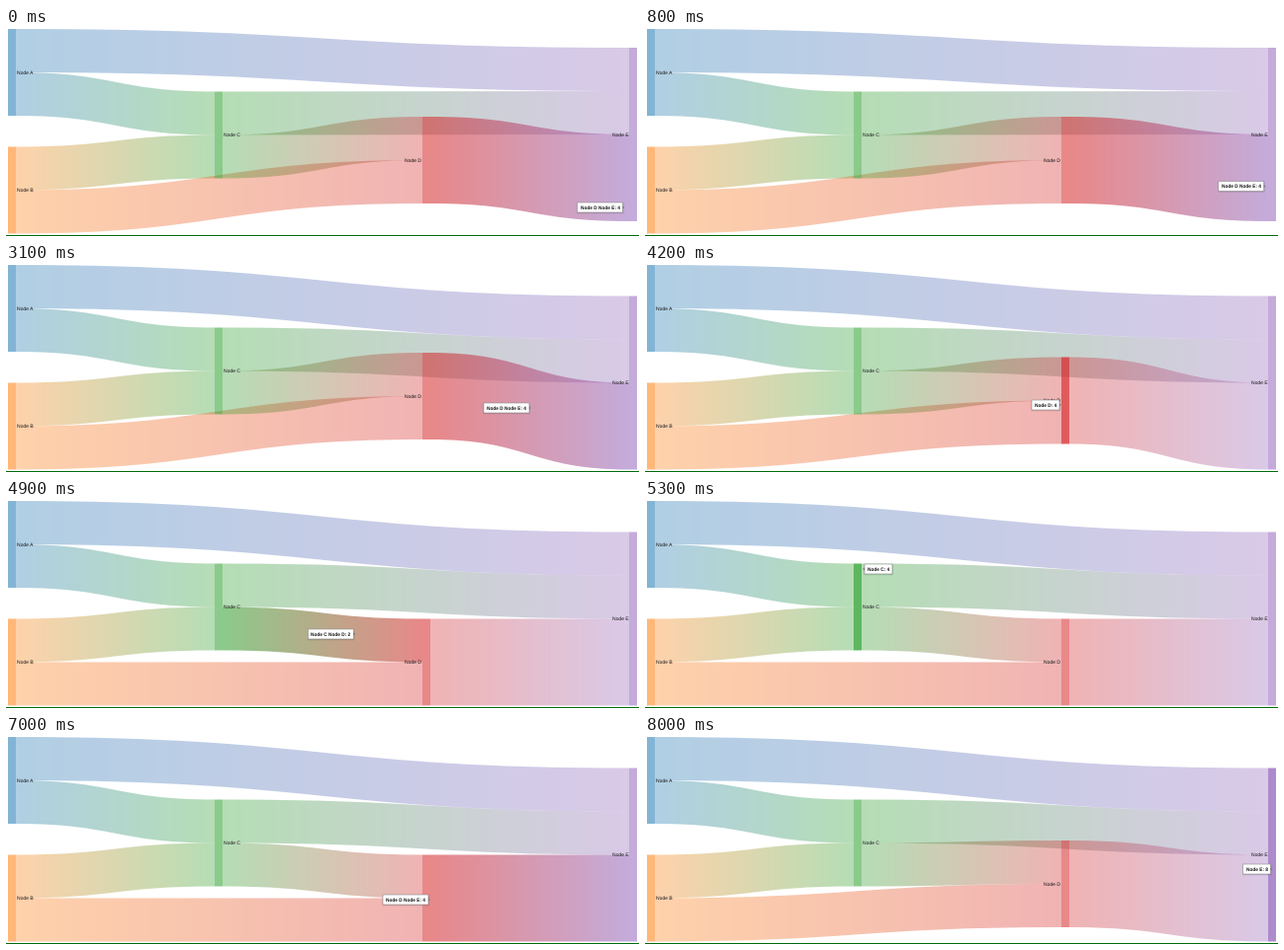
Write a matplotlib script that moves like this. It is 640 px wide and 211 px high and loops after 8100 ms.

```python
import matplotlib.pyplot as plt
import numpy as np
from matplotlib.animation import FuncAnimation
from matplotlib.colors import to_rgb
from matplotlib.patches import Polygon, Rectangle
from matplotlib.path import Path

W, H, DPI = 640, 211, 64
FRAMES, STEP = 81, 100
UNIT = 22            # pixels per unit of flow
BAR = 8              # node width
LINK_ALPHA, NODE_ALPHA, HOT_ALPHA = 0.35, 0.55, 0.76

plt.rcParams["font.family"] = "Liberation Sans"
plt.rcParams["text.hinting"] = "none"

# name: (left, top, value, colour)
NODES = {
    "A": (2, 1, 4, "#1f77b4"),
    "B": (2, 120.5, 4, "#ff7f0e"),
    "C": (211, 64.5, 4, "#2ca02c"),
    "D": (421, 90, 4, "#d62728"),
    "E": (630, 20, 8, "#9467bd"),
}
# start node, end node, value, units stacked above it at the start and at the end
LINKS = [
    ("A", "E", 2, 0, 0),
    ("A", "C", 2, 2, 0),
    ("B", "C", 2, 0, 2),
    ("B", "D", 2, 2, 2),
    ("C", "E", 2, 0, 2),
    ("C", "D", 2, 2, 0),
    ("D", "E", 4, 0, 4),
]

# time, x, y of the pointer
POINTER = np.array([
    (0, 626.5, 182), (700, 628, 164), (1300, 632.5, 143), (1800, 632.5, 143),
    (2500, 632.5, 155.5), (3100, 532, 146), (3900, 422, 138.5),
    (4000, 422, 138.5), (4200, 422, 143), (4700, 422, 169),
    (5300, 219, 70), (5900, 217, 100), (7000, 430, 166), (7100, 427, 166),
    (7500, 427, 151.5), (8000, 635.5, 135),
])
# dragged nodes: times, tops
DRAGS = {
    "E": ([1800, 2500], [20, 32.5]),
    "D": ([4000, 4200, 4700, 7100, 7500], [90, 94.5, 120.5, 120.5, 106]),
}
HELD = [(1800, 2500, "E"), (4000, 4700, "D"), (7100, 7500, "D")]

S = np.linspace(0, 1, 200)
EASE_X = 1.5 * S * (1 - S) + S ** 3
EASE_Y = S * S * (3 - 2 * S)


def px(size):
    return size * 72 / DPI


def rgb(name):
    return np.array(to_rgb(NODES[name][3]))


def tops_at(t):
    tops = {name: node[1] for name, node in NODES.items()}
    for name, (times, values) in DRAGS.items():
        tops[name] = np.interp(t, times, values)
    return tops


def span(link, tops):
    """Ends of the upper edge and the thickness of a link."""
    a, b, value, above_a, above_b = link
    return (NODES[a][0] + BAR, tops[a] + above_a * UNIT,
            NODES[b][0], tops[b] + above_b * UNIT, value * UNIT)


def ribbon(link, tops):
    x0, y0, x1, y1, h = span(link, tops)
    xm = (x0 + x1) / 2
    points = [(x0, y0), (xm, y0), (xm, y1), (x1, y1), (x1, y1 + h),
              (xm, y1 + h), (xm, y0 + h), (x0, y0 + h), (x0, y0)]
    codes = ([Path.MOVETO] + [Path.CURVE4] * 3 + [Path.LINETO]
             + [Path.CURVE4] * 3 + [Path.CLOSEPOLY])
    return Path(points, codes)


def on_link(link, tops, x, y):
    x0, y0, x1, y1, h = span(link, tops)
    if not x0 <= x <= x1:
        return False
    top = y0 + (y1 - y0) * np.interp((x - x0) / (x1 - x0), EASE_X, EASE_Y)
    return top <= y <= top + h


def hovered(t, tops, x, y):
    for start, end, name in HELD:
        if start <= t <= end:
            return name
    for name, (left, _, value, _) in NODES.items():
        if left <= x <= left + BAR and tops[name] <= y <= tops[name] + value * UNIT:
            return name
    for link in reversed(LINKS):
        if on_link(link, tops, x, y):
            return link
    return None


fig = plt.figure(figsize=(W / DPI, H / DPI), dpi=DPI, facecolor="white")
ax = fig.add_axes([0, 0, 1, 1])
ax.axis("off")

bands = []
for z, link in enumerate(LINKS):
    x0, x1 = NODES[link[0]][0] + BAR, NODES[link[1]][0]
    mix = ((np.arange(x1 - x0) + 0.5) / (x1 - x0))[:, None]
    colours = rgb(link[0]) * (1 - mix) + rgb(link[1]) * mix
    bands.append(ax.imshow(colours[None], extent=(x0, x1, H, 0), aspect="auto",
                           interpolation="nearest", zorder=1 + z / 10))

bars, labels = {}, {}
for name, (left, top, value, colour) in NODES.items():
    bars[name] = ax.add_patch(Rectangle((left, top), BAR, value * UNIT, color=colour,
                                        lw=0, snap=False, zorder=3))
    right = name in "DE"
    labels[name] = ax.text(left - 0.8 if right else left + BAR + 1.2, top, "Node " + name,
                           size=px(5), color="#111111", va="center_baseline",
                           ha="right" if right else "left", zorder=4)

ax.add_patch(Rectangle((0, 210), W, 1, color="#006a0c", lw=0, zorder=5))

shadow = ax.add_patch(Rectangle((0, 0), 1, 1, fc="black", alpha=0.12, lw=0,
                                snap=False, zorder=6))
box = ax.add_patch(Rectangle((0, 0), 1, 1, fc="white", ec="#8c8c8c", lw=px(0.6),
                             snap=False, zorder=7))
arrow = ax.add_patch(Polygon([(0, 0), (1, 0), (1, 1)], color="#777777", lw=0, zorder=7))
tip = ax.text(0, 0, "", size=px(4.75), weight="bold", color="#111111",
              ha="center", va="center_baseline", zorder=8)

ax.set_xlim(0, W)
ax.set_ylim(H, 0)


def show_tip(hot, x, y):
    for part in (shadow, box, arrow, tip):
        part.set_visible(hot is not None)
    if hot is None:
        return
    if isinstance(hot, str):
        text, width = f"Node {hot}: {NODES[hot][2]}", 28
    else:
        text, width = f"Node {hot[0]} Node {hot[1]}: {hot[2]}", 46
    side = 1 if x < W / 2 else -1
    edge = x + 3 * side
    left = edge if side > 0 else edge - width
    box.set_bounds(left, y - 5, width, 10)
    shadow.set_bounds(left - 0.5, y - 4.5, width + 1.5, 10.8)
    arrow.set_xy([(edge, y - 1.5), (edge, y + 1.5), (edge - 1.8 * side, y)])
    tip.set_position((left + width / 2, y + 0.1))
    tip.set_text(text)


def draw(i):
    t = i * STEP
    x, y = (np.interp(t, POINTER[:, 0], POINTER[:, k]) for k in (1, 2))
    tops = tops_at(t)
    hot = hovered(t, tops, x, y)
    for link, band in zip(LINKS, bands):
        band.set_clip_path(ribbon(link, tops), ax.transData)
        band.set_alpha(NODE_ALPHA if link == hot else LINK_ALPHA)
    for name, bar in bars.items():
        bar.set_y(tops[name])
        bar.set_alpha(HOT_ALPHA if name == hot else NODE_ALPHA)
        labels[name].set_y(tops[name] + NODES[name][2] * UNIT / 2 + 0.1)
    show_tip(hot, x, y)
    return []


anim = FuncAnimation(fig, draw, frames=FRAMES, interval=STEP, init_func=lambda: draw(0),
                     repeat=True, repeat_delay=0, blit=False)
plt.show()
```
